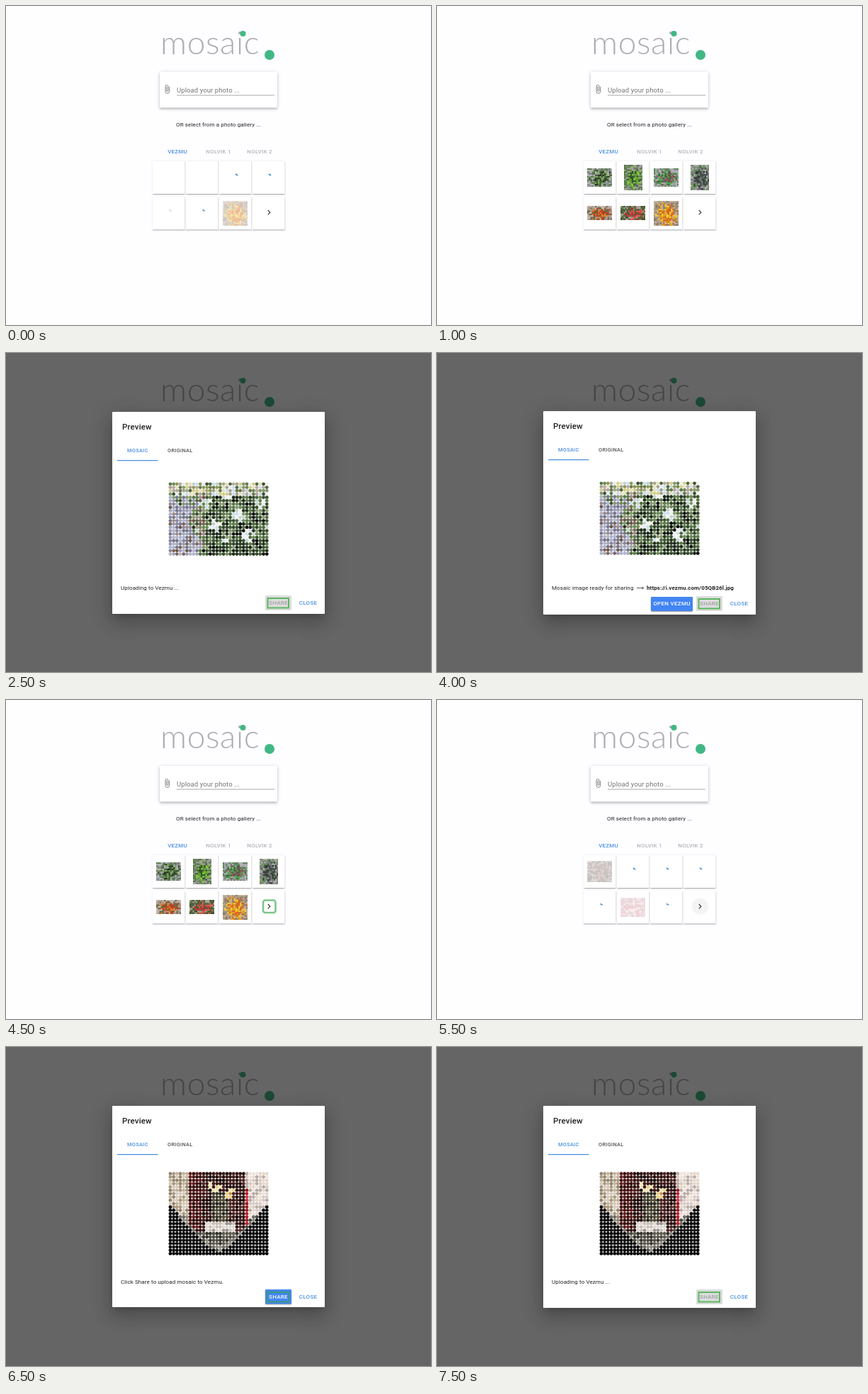
Recreate the animation shown at these times as an HTML page with a canvas. Size 600x450 px, loop 8000 ms.

```html
<!DOCTYPE html>
<html lang="en">
<head>
<meta charset="utf-8">
<title>Photo mosaic</title>
<style>
html, body { margin: 0; width: 100%; height: 100%; overflow: hidden; background: #fefdff; }
canvas { display: block; width: 600px; height: 450px; }
</style>
</head>
<body>
<canvas id="stage" width="600" height="450"></canvas>
<script>
const ctx = document.getElementById('stage').getContext('2d');
const BLUE = '#4285f4', LINK = '#4a90e2', GREEN = '#41b883', RING = '#5cb860';
const STEP = 500, STEPS = 16;

const noise = n => { const s = Math.sin(n * 127.1 + 11.7) * 43758.5453; return s - Math.floor(s); };
const pick = (list, r) => list[Math.floor(r * list.length)];

function text(str, x, y, size, color, { weight = 400, gap = 0.11, align = 'left', font = 'Roboto' } = {}) {
  ctx.font = `${weight} ${size}px ${font}, sans-serif`;
  ctx.letterSpacing = gap + 'px';
  ctx.textAlign = align;
  ctx.fillStyle = color;
  ctx.fillText(str, x, y);
}

function box(x, y, w, h, fill, r = 1) {
  ctx.fillStyle = fill;
  ctx.beginPath();
  ctx.roundRect(x, y, w, h, r);
  ctx.fill();
}

function disc(x, y, r, fill) {
  ctx.fillStyle = fill;
  ctx.beginPath();
  ctx.arc(x, y, r, 0, 7);
  ctx.fill();
}

function line(points, color, width) {
  ctx.strokeStyle = color;
  ctx.lineWidth = width;
  ctx.beginPath();
  points.forEach(p => ctx.lineTo(...p));
  ctx.stroke();
}

function ring(x, y, w, h, color = RING, r = 0, width = 2) {
  ctx.strokeStyle = color;
  ctx.lineWidth = width;
  ctx.beginPath();
  ctx.roundRect(x, y, w, h, r);
  ctx.stroke();
}

// The caster stays off stage so that only its shadow shows.
function shadow(x, y, w, h, layers) {
  ctx.save();
  for (const [dy, blur, spread, alpha] of layers) {
    ctx.shadowColor = `rgba(0,0,0,${alpha})`;
    ctx.shadowBlur = blur;
    ctx.shadowOffsetX = 2000;
    ctx.shadowOffsetY = dy;
    ctx.fillStyle = '#000';
    ctx.fillRect(x - spread - 2000, y - spread, w + 2 * spread, h + 2 * spread);
  }
  ctx.restore();
}

const LOW = [[1.7, 0.6, -1.2, 0.2], [1.2, 1.2, 0, 0.16], [0.6, 2.9, 0, 0.14]];
const MID = [[1.2, 2.3, -0.6, 0.22], [2.3, 2.9, 0, 0.16], [0.6, 5.8, 0, 0.14]];
const HIGH = [[6.4, 8.7, -4, 0.2], [14, 22, 1.7, 0.14], [5.2, 26.7, 4.6, 0.12]];

function card(x, y, w, h, layers, fill = '#fff') {
  shadow(x, y, w, h, layers);
  box(x, y, w, h, fill);
}

// Thumbnails: x, y, width, height, outer tones, inner tones.
const PLANTS = [
  [212, 229, 35, 26, ['#8a8f98', '#b5b4b4', '#5d7a4a'], ['#3f6134', '#24351f', '#7fa164']],
  [264, 224, 26, 36, ['#6f7a68', '#a29f9f', '#4c7a3a'], ['#5aa02c', '#86c440', '#34502c']],
  [306, 229, 35, 26, ['#9aa3a5', '#5f8459', '#b3adb6'], ['#35683c', '#55a24c', '#8a4a5c']],
  [358, 224, 26, 36, ['#6d9a58', '#a9b3a6', '#82748a'], ['#2c3a30', '#414a48', '#6d7570']],
  [212, 282, 35, 20, ['#a89a90', '#6c6a4e', '#c4b7ae'], ['#c83c20', '#e07a2c', '#6b5a28']],
  [259, 282, 35, 20, ['#56703c', '#a79e94', '#3a4a30'], ['#b83434', '#d8584c', '#4a5c34']],
  [306, 275, 35, 35, ['#a8947c', '#c0ae9a', '#8a7a68'], ['#e09a1c', '#d2601c', '#f0c83c']]
];
const THINGS = [
  [212, 227, 35, 30, ['#171412', '#4a2320', '#8d7a6c'], ['#5c1a1a', '#2a1d18', '#7d6a58']],
  null,
  [310, 224, 27, 35, ['#7d8078', '#a5a69c', '#4d534a'], ['#45609c', '#a84a50', '#60685e']],
  [353, 224, 35, 35, ['#d8cbb0', '#c2bcae', '#a9a894'], ['#e8c43c', '#dfae28', '#f0d468']],
  [217, 275, 26, 35, ['#2c302c', '#5a6850', '#a0a8a0'], ['#2a4a84', '#1c2430', '#3a60a0']],
  [259, 279, 35, 27, ['#b03a44', '#d8909a', '#86545c'], ['#c02834', '#e4b4b8', '#8c3440']],
  [310, 275, 27, 35, ['#54689c', '#a8a4a8', '#8c3c44'], ['#b83c40', '#3c58a4', '#d8d0cc']]
];

function photo([x, y, w, h, outer, inner], seed, alpha) {
  ctx.save();
  ctx.globalAlpha = alpha;
  ctx.beginPath();
  ctx.rect(x, y, w, h);
  ctx.clip();
  const size = 2.2;
  let n = seed * 977;
  for (let j = 0; j < h; j += size) {
    for (let i = 0; i < w; i += size) {
      const d = Math.hypot(i / w - 0.5, j / h - 0.5) + (noise(n++) - 0.5) * 0.3;
      ctx.fillStyle = pick(d < 0.36 ? inner : outer, noise(n++));
      ctx.fillRect(x + i, y + j, size + 0.4, size + 0.4);
    }
  }
  ctx.restore();
}

const TONES = {
  dark: ['#1d2a1a', '#0b0f0a', '#33472c', '#26351f', '#3c5232'],
  green: ['#4f6b3f', '#6d8a58', '#3c5230', '#86996f', '#5c7a4a'],
  lilac: ['#9a9ab4', '#8888a0', '#b0b4cc', '#76768c', '#a4a8b8'],
  light: ['#e8eef0', '#cfe0ea', '#f0f2ec', '#c4d4d0'],
  top: ['#d4d08c', '#8a9a5a', '#a7a58e', '#e6e2c0', '#6b7a4c', '#b8a8a0'],
  brown: ['#6b5650', '#80655c', '#a08a86']
};

function plantTone(u, v, a, b) {
  const patch = Math.sin(u * 17 + v * 5) * Math.sin(v * 13 - u * 6);
  let kind = 'green';
  if (v < 0.17) kind = a < 0.6 ? 'top' : a < 0.8 ? 'green' : 'light';
  else if (u < 0.26 + 0.06 * Math.sin(v * 9)) kind = v < 0.3 && a < 0.5 ? 'green' : a < 0.85 ? 'lilac' : 'brown';
  else if (v < 0.82 && patch > 0.45 && a < 0.75) kind = 'light';
  else if (u < 0.38 && a < 0.35) kind = 'brown';
  else if (a < 0.25 + v * 0.5) kind = 'dark';
  return pick(TONES[kind], b);
}

function glassTone(u, v, a, b) {
  const edge = 0.36 + 0.59 * (1 - Math.abs(2 * u - 1) ** 1.4);
  if (v > edge) return '#050505';
  if (v > edge - 0.06 && v > 0.5) return pick(['#6e6a62', '#48463f', '#8c877c'], b);
  if (u > 0.38 && u < 0.66 && v > 0.61 && v < 0.71) return pick(['#c8c0b8', '#9c948c', '#e0d8d2'], b);
  if (v > 0.71) return pick(['#4c4a40', '#5e5a50', '#35332c'], b);
  if (u < 0.2) return pick(['#c4b49c', '#a8987e', '#d6cabc', '#94866e'], b);
  if (u < 0.34) return pick(['#4a1414', '#641c1c', '#34100e'], b);
  if (u > 0.75 && u < 0.8 && v > 0.18) return pick(['#c01c2c', '#d83444', '#a01824'], b);
  if (u > 0.77) return pick(['#f0e4e0', '#d8ccc8', '#e8d8cc', '#b8aca4'], b);
  const glow = Math.min(Math.hypot(u - 0.46, v - 0.17), Math.hypot(u - 0.63, v - 0.27));
  if (glow < 0.06 && a < 0.75) return pick(['#e8d080', '#c89c4c', '#f0e4b0'], b);
  return u > 0.42 && u < 0.6 && v > 0.25
    ? pick(['#3c3828', '#504a38', '#2a281e'], b)
    : pick(['#2a100e', '#3c1816', '#1a0c0a', '#4c2420'], b);
}

function mosaic(y, rows, tone) {
  const cols = 30, pitch = 4.7;
  for (let j = 0; j < rows; j++) {
    for (let i = 0; i < cols; i++) {
      const n = j * cols + i;
      disc(229.6 + (i + 0.5) * pitch, y + (j + 0.5) * pitch, 2.4,
        tone((i + 0.5) / cols, (j + 0.5) / rows, noise(n), noise(n + 4000)));
    }
  }
}

const CLIP = new Path2D('M16.5 6v11.5c0 2.21-1.79 4-4 4s-4-1.79-4-4V5c0-1.38 1.12-2.5 2.5-2.5s2.5 1.12 2.5 2.5v10.5c0 .55-.45 1-1 1s-1-.45-1-1V6H10v9.5c0 1.38 1.12 2.5 2.5 2.5s2.5-1.12 2.5-2.5V5c0-2.21-1.79-4-4-4S7 2.79 7 5v12.5c0 3.04 2.46 5.5 5.5 5.5s5.5-2.46 5.5-5.5V6h-1.5z');

function page() {
  ctx.fillStyle = '#fefdff';
  ctx.fillRect(0, 0, 600, 450);
  text('mosaic', 218, 68, 46, '#adadb0', { weight: 300, gap: 0.6, font: 'Lato' });
  disc(334.5, 39, 4, GREEN);
  disc(372, 69, 7, GREEN);

  card(217, 93, 166, 50.5, MID);
  ctx.save();
  ctx.translate(220.5, 110.3);
  ctx.scale(0.583, 0.583);
  ctx.fillStyle = '#777';
  ctx.fill(CLIP);
  ctx.restore();
  text('Upload your photo ...', 241, 121.5, 9.5, '#757575', { gap: 0.09 });
  line([[241, 126], [379, 126]], '#949494', 0.8);
  text('OR select from a photo gallery ...', 300, 170, 8, '#222', { align: 'center', gap: 0.13 });

  const tab = (label, x, color) => text(label, x, 207.5, 7.9, color, { weight: 500, gap: 0.25, align: 'center' });
  tab('VEZMU', 242, LINK);
  tab('NOLVIK 1', 300, '#b4b4b6');
  tab('NOLVIK 2', 358, '#b4b4b6');
  for (let i = 0; i < 8; i++) card(206.5 + (i % 4) * 47, i < 4 ? 218.5 : 269, 46, 46.5, LOW);
}

function gallery(photos, alphas, spinners = [], button = '') {
  photos.forEach((p, i) => {
    const alpha = alphas[i] ?? alphas[0];
    if (p && alpha) photo(p, i + 1, alpha);
  });
  for (const [x, y, color = '#3a8ed8'] of spinners) line([[x - 1.5, y - 1], [x + 1.5, y + 1]], color, 1.6);
  if (button === 'hover') disc(371.3, 291, 11.5, '#f4f4f5');
  if (button === 'ring') ring(363, 282.5, 17.5, 17.5, '#7cc58a', 3, 2.6);
  line([[369.8, 288], [372.8, 291.2], [369.8, 294.4]], '#444', 1.3);
}

function dialog(phase, second, { pressed = false, closeRing = false } = {}) {
  const ready = phase === 'ready', idle = phase === 'click';
  const top = ready ? 82 : 83, bottom = ready ? 369 : idle ? 367 : 368;
  const low = ready ? 1 : 0;
  ctx.fillStyle = 'rgba(0,0,0,.6)';
  ctx.fillRect(0, 0, 600, 450);
  card(150, top, 300, bottom - top, HIGH);

  text('Preview', 164, top + 25.3, 11.5, '#222', { weight: 500, gap: 0.14 });
  text('MOSAIC', 171, top + 57, 7.4, LINK, { weight: 500, gap: 0.28 });
  text('ORIGINAL', 228, top + 57, 7.4, '#555', { weight: 500, gap: 0.3 });
  box(157, top + 68, 57.5, 1.2, LINK, 0);
  if (second) mosaic(top + 93.3, 25, glassTone);
  else mosaic(top + 99.5, 22, plantTone);

  if (ready) {
    text('Mosaic image ready for sharing', 162, 334, 8, '#222');
    line([[282, 331.5], [291.5, 331.5]], '#333', 0.8);
    line([[289.5, 329.7], [291.7, 331.5], [289.5, 333.3]], '#333', 0.8);
    text('https://i.vezmu.com/05QB26l.jpg', 296, 334, 8, '#222', { weight: 700 });
  } else {
    text(idle ? 'Click Share to upload mosaic to Vezmu.' : 'Uploading to Vezmu ...', 162, 334, 8, '#222');
  }

  const label = { weight: 500, gap: 0.3 };
  const base = 355.2 + low;
  if (ready) {
    card(302, 344, 59, 20, LOW, BLUE);
    text('OPEN VEZMU', 331.5, base, 8, '#fff', { ...label, align: 'center' });
  }
  if (idle) card(366, 342, 37, 20.5, LOW, pressed ? '#5b95f6' : BLUE);
  else box(366, 342 + low, 37, 21, '#dcdcde');
  text('SHARE', 371, base, 8, idle ? '#fff' : '#a2a2a2', label);
  ring(369.5, 346 + low, 29.5, 13.5, idle ? '#3a9a78' : RING);
  text('CLOSE', 413.7, base, 8, LINK, label);
  if (closeRing) ring(411, 347, 32, 14);
}

const scenes = [
  () => gallery(PLANTS, [0, 0, 0, 0, 0, 0, 0.35], [[325.5, 238], [372.5, 238], [279, 288.3], [232, 288.3, '#d0d4d8']]),
  () => gallery(PLANTS, [0.5, 0.5, 0.5, 0.5, 0.5, 0.5, 1]),
  () => gallery(PLANTS, [1]),
  () => dialog('click', false),
  () => dialog('click', false, { pressed: true }),
  () => dialog('upload', false),
  () => dialog('ready', false),
  () => dialog('ready', false, { closeRing: true }),
  () => dialog('ready', false),
  () => gallery(PLANTS, [1], [], 'ring'),
  () => gallery(PLANTS, [1], [], 'hover'),
  () => gallery(THINGS, [0.2, 0, 0, 0, 0, 0.15, 0], [[278.5, 238], [325.5, 238], [372.5, 238], [232, 288.3], [325.5, 288.3]], 'hover'),
  () => gallery(THINGS, [0.7, 0, 0.5, 0.55, 0.5, 0.5, 0.5], [[278, 241, '#c4c8cc']], 'hover'),
  () => dialog('click', true),
  () => dialog('click', true, { pressed: true }),
  () => dialog('upload', true)
];

let start, shown = -1;
function frame(now) {
  start ??= now;
  const step = Math.floor((now - start) / STEP) % STEPS;
  if (step !== shown) {
    shown = step;
    page();
    scenes[step]();
  }
  requestAnimationFrame(frame);
}
requestAnimationFrame(frame);
</script>
</body>
</html>
```
